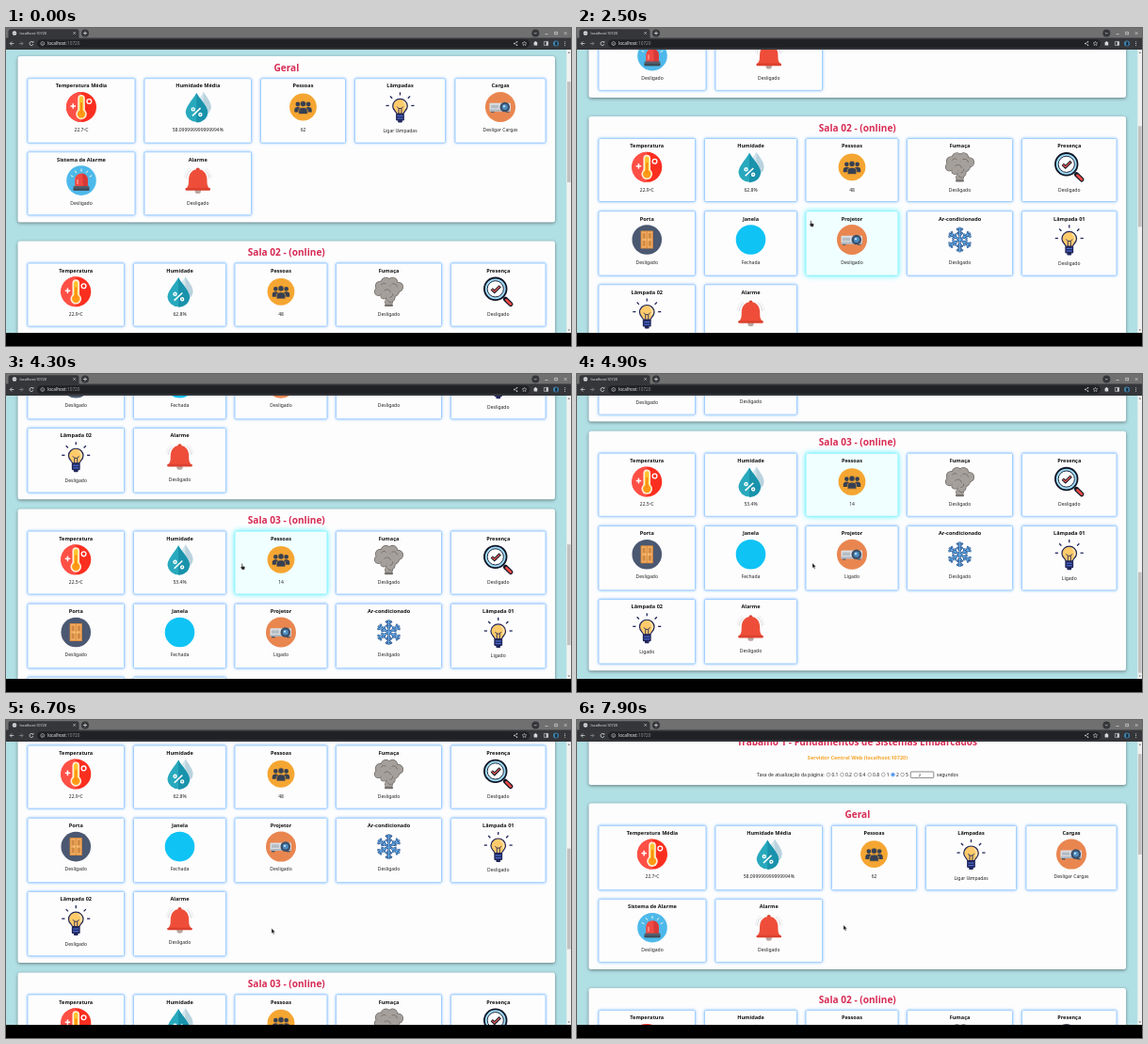
Animation, 600 px wide and 338 px high, one loop 8000 ms. Source, as an HTML page with a canvas:

```html
<!DOCTYPE html>
<html lang="pt">
<head>
<meta charset="utf-8">
<title>localhost:10720</title>
<style>
html, body { margin: 0; width: 100%; height: 100%; overflow: hidden; background: #000; }
canvas { display: block; width: 600px; height: 338px; }
</style>
</head>
<body>
<canvas id="stage"></canvas>
<script>
const W = 600, H = 338, LOOP = 8000, TOP = 23, BOTTOM = 324;
const FONT = '"Noto Sans", "Open Sans", sans-serif';
const canvas = document.getElementById('stage');
const g = canvas.getContext('2d');
const dpr = Math.max(1, window.devicePixelRatio || 1);
canvas.width = W * dpr;
canvas.height = H * dpr;

// ---- timing: [time, values...] ----
// The page jumps one wheel notch at a time, down to its end and then back up.
const NOTCH = 16.56, PAGE_END = 438.2, HOVER_LAG = 250;
const wheelDown = [[1050, 0], [1200, 1], [1600, 4], [1750, 4], [2200, 8], [2600, 8], [2900, 12], [3000, 12],
  [3300, 17], [3700, 17], [4200, 21], [4600, 21], [4900, 26], [5000, 27]];
const wheelUp = [[5450, 0], [6000, 5], [6150, 5], [6700, 13], [7900, 30], [8000, 31]];
const mouseKeys = [[0, 242, 208], [1200, 242, 208], [2500, 247.5, 204.5], [3600, 249.5, 201.5],
  [4900, 250, 201], [5400, 250, 201], [6700, 282, 221.5], [7900, 283, 218]];

function sample(keys, t, k = 1) {
  let i = 1;
  while (i < keys.length - 1 && keys[i][0] < t) i++;
  const a = keys[i - 1], b = keys[i];
  const u = Math.min(1, Math.max(0, (t - a[0]) / (b[0] - a[0])));
  return a[k] + (b[k] - a[k]) * u;
}
function scrollAt(t) {
  const down = Math.round(sample(wheelDown, t)), up = Math.round(sample(wheelUp, t));
  return Math.min(PAGE_END, down * NOTCH) - up * NOTCH;
}

// ---- drawing helpers ----
function text(s, x, y, size, color, bold, align = 'center') {
  g.font = (bold ? 'bold ' : '') + size + 'px ' + FONT;
  g.textAlign = align;
  g.textBaseline = 'alphabetic';
  g.fillStyle = color;
  g.fillText(s, x, y + size * 0.36);
}
function rect(x, y, w, h, color, r = 0) {
  g.fillStyle = color;
  g.beginPath();
  g.roundRect(x, y, w, h, r);
  g.fill();
}
function disc(x, y, r, fill, stroke, width = 1) {
  g.beginPath();
  g.arc(x, y, r, 0, 7);
  paint(fill, stroke, width);
}
function paint(fill, stroke, width = 1) {
  if (fill) { g.fillStyle = fill; g.fill(); }
  if (stroke) { g.strokeStyle = stroke; g.lineWidth = width; g.stroke(); }
}
function line(color, width, ...p) {
  g.beginPath();
  for (let i = 0; i < p.length; i += 2) g.lineTo(p[i], p[i + 1]);
  paint(null, color, width);
}
function shape(d, fill, stroke, width = 1) {
  const p = new Path2D(d);
  if (fill) { g.fillStyle = fill; g.fill(p); }
  if (stroke) { g.strokeStyle = stroke; g.lineWidth = width; g.stroke(p); }
}
function shadow(color, blur, dy = 0) {
  g.shadowColor = color;
  g.shadowBlur = blur * dpr;
  g.shadowOffsetY = dy * dpr;
}
const noShadow = () => shadow('transparent', 0);

// ---- icons, each centred on 0,0 and about 32 wide ----
const NAVY = '#20265a';
const icons = {
  temp() {
    disc(0, 0, 16, '#fb2f20');
    g.beginPath(); g.arc(0, 0, 16, Math.PI / 2, Math.PI * 1.5); paint('#ff5046');
    rect(-3.8, -13, 7.6, 20, '#fff0d8', 3.8);
    disc(0, 7.5, 5.8, '#fff0d8');
    rect(-2.2, -11.4, 4.4, 19, '#ffc52e', 2.2);
    disc(0, 7.5, 4.2, '#ff9b16');
    rect(-1, -5, 2, 12, '#ff8a12', 1);
    line('#fff', 1.5, -11.5, -1, -6, -1);
    line('#fff', 1.5, -8.8, -3.8, -8.8, 1.8);
    disc(8.3, -6, 2.4, null, '#fff', 1.3);
  },
  drop() {
    shape('M6 -16C10 -9 14 -6 14 0A8 8 0 0 1 6 8A8 8 0 0 1 -2 0C-2 -6 2 -9 6 -16Z', '#d5e5ec');
    shape('M6 -16C10 -9 14 -6 14 0A8 8 0 0 1 6 8Z', '#b9d3de');
    shape('M-1.5 -15C3 -7 10.5 -1 10.5 6A11.8 11 0 0 1 -13 6C-13 -1 -6 -7 -1.5 -15Z', '#28a9bd');
    shape('M-1.5 -15C3 -7 10.5 -1 10.5 6A11.8 11 0 0 1 -1.5 16.5Z', '#1992ab');
    line('#fff', 1.6, 2.8, 1.2, -5.8, 9.4);
    disc(-5, 2.4, 1.5, null, '#fff', 1.4);
    disc(2.6, 8, 1.5, null, '#fff', 1.4);
  },
  people() {
    disc(0, 0, 14.4, '#f5a632');
    for (const x of [-5.6, 5.6]) {
      disc(x, -3, 2.4, '#374052');
      shape(`M${x - 3.6} 5.4V3Q${x - 3.6} 0 ${x} 0Q${x + 3.6} 0 ${x + 3.6} 3V5.4Z`, '#374052');
    }
    disc(0, -3.4, 3.2, '#374052', '#f5a632', 0.7);
    shape('M-4.8 7.6V4Q-4.5 0.4 0 0.4Q4.5 0.4 4.8 4V7.6Z', '#374052', '#f5a632', 0.7);
  },
  lamp() {
    shape('M-3.8 7C-3.8 4.5 -7.8 3.5 -7.8 -1A7.8 7.6 0 0 1 7.8 -1C7.8 3.5 3.8 4.5 3.8 7Z', '#ffcb6b', NAVY, 1.2);
    shape('M3 -6.2A6 6 0 0 1 5 2', null, '#ffeac0', 1.2);
    shape('M-1.5 7V1.5L-3.3 -0.5M1.5 7V1.5L3.3 -0.5M-1.5 1.5H1.5', null, NAVY, 0.9);
    rect(-4.4, 7, 8.8, 7.4, NAVY, 1.2);
    line('#4d70d8', 1.2, -3, 9.4, 3, 9.4);
    line('#4d70d8', 1.2, -3, 12, 3, 12);
    rect(-2.4, 14, 4.8, 2.4, NAVY, 1);
    for (let i = 0; i < 5; i++) {
      const a = -Math.PI + i * Math.PI / 4, c = Math.cos(a), s = Math.sin(a);
      line(NAVY, 1.3, c * 11.8, -1.5 + s * 11, c * 15, -1.5 + s * 14.2);
    }
  },
  projector() {
    disc(0, 0, 16, '#e98650');
    rect(-10, 4, 3.5, 1.8, '#4c5662');
    rect(6, 4, 3.5, 1.8, '#4c5662');
    rect(-11.5, -4.2, 22.5, 8.6, '#d9dee3', 1);
    rect(-11.5, 2.4, 22.5, 2, '#aeb8c2', 1);
    for (let i = 0; i < 4; i++) line('#7e8a96', 0.8, -9 + i * 2, -2.2, -9 + i * 2, 1.3);
    disc(4.8, 0, 5.3, '#3c4f68');
    disc(4.8, 0, 3, '#4f8fc4');
    disc(4, -0.8, 1, '#d8f2ff');
  },
  siren() {
    disc(0, 0, 15.8, '#4db9ea');
    shape('M-6.8 7V-1A6.8 6.5 0 0 1 6.8 -1V7Z', '#f04a42');
    shape('M1 -7.5A6.8 6.5 0 0 1 6.8 -1V7H2Z', '#d93a38');
    line('#ffaaa2', 1.2, -4, 4, -4, -1);
    rect(-8.5, 6, 17, 4.6, '#50606e', 1);
    rect(-8.5, 8.5, 17, 2.1, '#3f4b57', 1);
    for (const a of [-2.7, -2.15, -1.57, -0.99, -0.44]) {
      const c = Math.cos(a), s = Math.sin(a);
      line('#f4f5e5', 1, c * 9.5, s * 9.5, c * 12.5, s * 12.5);
    }
  },
  bell() {
    for (const k of [-1, 1]) {
      shape(`M${k * 7.5} -11.5Q${k * 12} -8 ${k * 12.5} -2`, null, '#d9d9dd', 1);
      shape(`M${k * 9} -13.5Q${k * 14} -9 ${k * 14.5} -3`, null, '#e7e7ea', 0.8);
    }
    disc(0, 10.8, 3.2, '#b9a6a0');
    disc(0, -11.6, 2, '#d64734');
    shape('M-13 9.5C-9 5.5 -10 2 -9.6 -2.5C-9 -8.5 -5 -11.8 0 -11.8C5 -11.8 9 -8.5 9.6 -2.5C10 2 9 5.5 13 9.5Z', '#ee4e39');
    rect(-13.3, 8, 26.6, 2.6, '#dc412f', 1.2);
  },
  smoke() {
    const puffs = [[-9, -6, 5], [-3, -10, 5], [4, -10, 5], [10, -5, 5], [-11, 0, 4], [-3, -2, 6], [5, -1, 6], [-5, 4, 3.5], [2, 6, 4.5], [0, 11, 3.8]];
    for (const [x, y, r] of puffs) disc(x, y, r, '#a5a09b', '#77726e', 1.2);
    for (const [x, y, r] of puffs) disc(x, y, r - 0.3, '#a5a09b');
    shape('M-8 -7A3 3 0 0 1 -3 -8M3 -8A4 4 0 0 1 9 -5M-5 -1A4 4 0 0 1 2 1M4 2A3 3 0 0 1 1 6M-1 9A3 3 0 0 0 3 11', null, '#77726e', 1);
    rect(-4.5, 13.4, 9, 2.4, '#77726e', 1);
  },
  search() {
    g.lineCap = 'round';
    line('#141827', 5, 7.6, 7.8, 13.2, 13.2);
    line('#ef4b46', 2.6, 8.6, 8.8, 13.2, 13.2);
    g.lineCap = 'butt';
    disc(-3, -3, 11.8, '#9fdcf8', '#101526', 1.8);
    disc(-3, -3, 8.6, '#fff', '#101526', 0.9);
    line('#101526', 3.2, -7, -3, -4, 0, 2, -6);
    line('#f05a50', 1.2, -6.6, -2.6, -4, -0.2, 1.5, -5.5);
  },
  door() {
    disc(0, 0, 15.8, '#4b5871');
    rect(-6.6, -9.5, 13.2, 19, '#d88a3c', 0.6);
    for (const x of [-5.8, 0.5]) {
      rect(x, -8.6, 5.3, 17.2, '#f1ac62');
      for (const y of [-7, 1.2]) rect(x + 1.2, y, 2.9, 5.6, '#d08a44');
    }
    disc(-1.4, 0, 0.6, '#fff0b0');
    disc(1.4, 0, 0.6, '#fff0b0');
  },
  round() { disc(0, 0, 15.8, '#0fc3f5'); },
  snow() {
    for (const [color, w] of [['#23457f', 2.3], ['#62aee9', 1]]) {
      for (let i = 0; i < 6; i++) {
        g.save();
        g.rotate(i * Math.PI / 3);
        line(color, w, 0, 0, 0, -13.3);
        line(color, w, -3.2, -12, 0, -9, 3.2, -12);
        line(color, w, -3, -7.6, 0, -4.8, 3, -7.6);
        g.restore();
      }
    }
  }
};

// ---- page content, in page coordinates ----
const OFF = 'Desligado';
const cards = [];
// A row holding a lamp is slightly taller.
function addRow(y, cols, items) {
  const h = items.some(item => item[1] === 'lamp') ? 68.4 : 67;
  items.forEach(([title, icon, value], i) =>
    cards.push({ x: cols[i][0], y, w: cols[i][1], h, title, icon, value }));
}
const wide = [[23, 114], [147, 113.5], [270.5, 90], [370.5, 96], [477, 96]];
const cols = [[23, 102.5], [135.5, 98], [243, 98], [350.5, 112], [472.5, 100.5]];

addRow(53.7, wide, [['Temperatura Média', 'temp', '22.7ºC'], ['Humidade Média', 'drop', '58.099999999999994%'],
  ['Pessoas', 'people', '62'], ['Lâmpadas', 'lamp', 'Ligar lâmpadas'], ['Cargas', 'projector', 'Desligar Cargas']]);
addRow(131.8, wide, [['Sistema de Alarme', 'siren', OFF], ['Alarme', 'bell', OFF]]);

function addRoom(y, temp, hum, people, load) {
  addRow(y + 23.5, cols, [['Temperatura', 'temp', temp], ['Humidade', 'drop', hum], ['Pessoas', 'people', people],
    ['Fumaça', 'smoke', OFF], ['Presença', 'search', OFF]]);
  addRow(y + 100.7, cols, [['Porta', 'door', OFF], ['Janela', 'round', 'Fechada'], ['Projetor', 'projector', load],
    ['Ar-condicionado', 'snow', OFF], ['Lâmpada 01', 'lamp', load]]);
  addRow(y + 178.8, cols, [['Lâmpada 02', 'lamp', load], ['Alarme', 'bell', OFF]]);
}
addRoom(226.5, '22.9ºC', '62.8%', '48', OFF);
addRoom(491.3, '22.5ºC', '53.4%', '14', 'Ligado');

const panels = [[-70, 80.5], [30, 176.5, 'Geral'], [226.5, 254.5, 'Sala 02 - (online)'], [491.3, 254.5, 'Sala 03 - (online)']];

function cardAt(t) {
  const x = sample(mouseKeys, t, 1) + 0.8, y = sample(mouseKeys, t, 2) + 3 + scrollAt(t);
  return cards.find(c => x > c.x && x < c.x + c.w && y > c.y && y < c.y + c.h);
}

function drawCard(c, hot) {
  shadow(hot ? '#3ff0ff' : '#5aaaff', hot ? 6 : 3.2);
  rect(c.x, c.y, c.w, c.h, hot ? '#f0ffff' : '#fff', 1.2);
  noShadow();
  g.beginPath();
  g.roundRect(c.x, c.y, c.w, c.h, 1.2);
  paint(hot ? '#f0ffff' : '#fdfdfe', hot ? '#8ff3ff' : '#a3cfff', 1);
  const cx = c.x + c.w / 2;
  text(c.title, cx, c.y + 7.8, 5.55, '#111', true);
  g.save();
  g.translate(cx, c.y + 30.3);
  icons[c.icon]();
  g.restore();
  text(c.value, cx, c.y + (c.icon === 'lamp' ? 55.4 : 54.2), 5, '#222');
}

function drawHeader() {
  text('Trabalho 1 - Fundamentos de Sistemas Embarcados', 297.5, -35.2, 10, '#d72c54', true);
  text('Servidor Central Web (localhost:10720)', 298, -18.4, 5.55, '#f5a52a', true);
  text('Taxa de atualização da página:', 191, -0.5, 5, '#222', false, 'left');
  [['0.1', 267], ['0.2', 281.5], ['0.4', 296], ['0.8', 310.7], ['1', 325.3], ['2', 335.5], ['5', 345.6]].forEach(([s, x]) => {
    const on = s === '2';
    disc(x, -0.5, 1.9, '#fff', on ? '#1a73e8' : '#777', 0.6);
    if (on) disc(x, -0.5, 1.2, '#1a73e8');
    text(s, x + 3.4, -0.5, 5, '#222', false, 'left');
  });
  g.beginPath();
  g.roundRect(354.3, -3.6, 24.5, 6.4, 0.8);
  paint('#fff', '#555', 0.7);
  text('2', 364, -0.4, 4.2, '#222');
  text('segundos', 382, -0.5, 5, '#222', false, 'left');
}

function drawPage(t) {
  const s = scrollAt(t), hot = t > 500 ? cardAt(t - HOVER_LAG) : null;
  g.save();
  g.beginPath();
  g.rect(0, TOP, W, BOTTOM - TOP);
  g.clip();
  rect(0, TOP, W, BOTTOM - TOP, '#b0dfe4');
  g.translate(0, -s);
  for (const [y, h, title] of panels) {
    shadow('rgba(0,0,0,.45)', 3.5, 1);
    rect(12.5, y, 570.5, h, '#fdfdfe', 2.5);
    noShadow();
    if (title) text(title, 297.8, y + 12, 10.1, '#d72c54', true);
  }
  drawHeader();
  for (const c of cards) {
    if (c.y - s < BOTTOM + 10 && c.y + 78 - s > TOP) drawCard(c, c === hot);
  }
  g.translate(0, s);
  rect(595.3, TOP, 4.7, BOTTOM - TOP, '#f1f1f1');
  rect(596, 57 + s * 0.357, 3.6, 107, '#c1c1c1');
  shape('M596.6 26.8L597.8 25.2L599 26.8Z M596.6 320.4L597.8 322L599 320.4Z', '#606060');
  g.restore();
}

function drawBrowser() {
  const fg = '#d5d7da';
  rect(0, 0, W, 11, '#707070');
  rect(2.5, 1.2, 75, 12, '#35363a', 2.5);
  rect(0, 10.5, W, 12.5, '#35363a');
  disc(9, 5.5, 2.3, '#dfe1e5');
  line('#6b7076', 0.5, 7, 5.5, 11, 5.5);
  text('localhost:10720', 14.5, 5.4, 3.9, '#e3e5e8', false, 'left');
  line(fg, 0.7, 71.4, 4.2, 73.8, 6.6);
  line(fg, 0.7, 73.8, 4.2, 71.4, 6.6);
  disc(84, 5.5, 4, '#35363a');
  line(fg, 0.8, 82, 5.5, 86, 5.5);
  line(fg, 0.8, 84, 3.5, 84, 7.5);
  disc(562.3, 5.4, 4, '#35363a');
  line(fg, 0.7, 561, 4.9, 562.3, 6.2, 563.6, 4.9);
  line(fg, 0.7, 572.5, 6.5, 575.5, 6.5);
  g.strokeRect(582.8, 4.2, 2.6, 2.6);
  line(fg, 0.7, 592.8, 4.2, 595.4, 6.8);
  line(fg, 0.7, 595.4, 4.2, 592.8, 6.8);

  line(fg, 0.8, 8.3, 16.5, 4.3, 16.5);
  line(fg, 0.8, 6.2, 14.5, 4.2, 16.5, 6.2, 18.5);
  line('#85888c', 0.8, 14, 16.5, 18, 16.5);
  line('#85888c', 0.8, 16, 14.5, 18, 16.5, 16, 18.5);
  g.beginPath();
  g.arc(27, 16.5, 2, 0.3, 5.6);
  paint(null, fg, 0.8);
  shape('M27.5 15.6H29.3V13.8Z', fg);
  rect(33, 12.2, 523, 8.8, '#202124', 4.4);
  disc(38.8, 16.5, 1.9, null, fg, 0.6);
  line(fg, 0.6, 38.8, 16.2, 38.8, 17.7);
  text('localhost', 44, 16.4, 4.7, '#eceef0', false, 'left');
  const w = g.measureText('localhost').width;
  text(':10720', 44 + w, 16.4, 4.7, '#8f949a', false, 'left');

  line(fg, 0.5, 542.6, 14.8, 539.8, 16.5, 542.6, 18.2);
  for (const [x, y] of [[542.6, 14.8], [539.8, 16.5], [542.6, 18.2]]) disc(x, y, 0.7, fg);
  g.beginPath();
  for (let i = 0; i < 10; i++) {
    const r = i % 2 ? 1.1 : 2.5, a = -Math.PI / 2 + i * Math.PI / 5;
    g.lineTo(550.5 + r * Math.cos(a), 16.6 + r * Math.sin(a));
  }
  g.closePath();
  paint(null, fg, 0.5);
  rect(560.6, 15, 3.6, 3.6, fg, 0.4);
  disc(562.4, 14.8, 0.9, fg);
  g.beginPath();
  g.rect(571.4, 14.4, 4.2, 4);
  paint(null, fg, 0.6);
  rect(573.7, 14.4, 1.9, 4, fg);
  disc(584, 16.5, 3, '#3f83ab');
  rect(583.2, 14.5, 2.2, 4.2, '#172738', 1);
  for (const y of [14.7, 16.5, 18.3]) disc(593.6, y, 0.55, fg);
  rect(0, BOTTOM, W, H - BOTTOM, '#000');
}

function drawMouse(t) {
  if (t < 500) return;
  g.save();
  g.translate(sample(mouseKeys, t, 1), sample(mouseKeys, t, 2));
  const now = cardAt(t);
  if (now && now === cardAt(t - HOVER_LAG)) {
    shape('M0.4 0.5Q1 -0.2 1.5 0.6V3L3.8 3.5Q4.2 3.7 4 4.6L3.5 6.8H1L-0.8 4.3Q-0.8 3.4 0.4 4Z', '#222', '#eee', 0.4);
  } else {
    shape('M0 0V5.2L1.2 4.2L2 6.1L3 5.7L2.2 3.8H3.8Z', '#111', '#ddd', 0.4);
  }
  g.restore();
}

function frame(now) {
  const t = now % LOOP;
  g.setTransform(dpr, 0, 0, dpr, 0, 0);
  drawPage(t);
  drawBrowser();
  drawMouse(t);
  requestAnimationFrame(frame);
}
requestAnimationFrame(frame);
</script>
</body>
</html>
```
